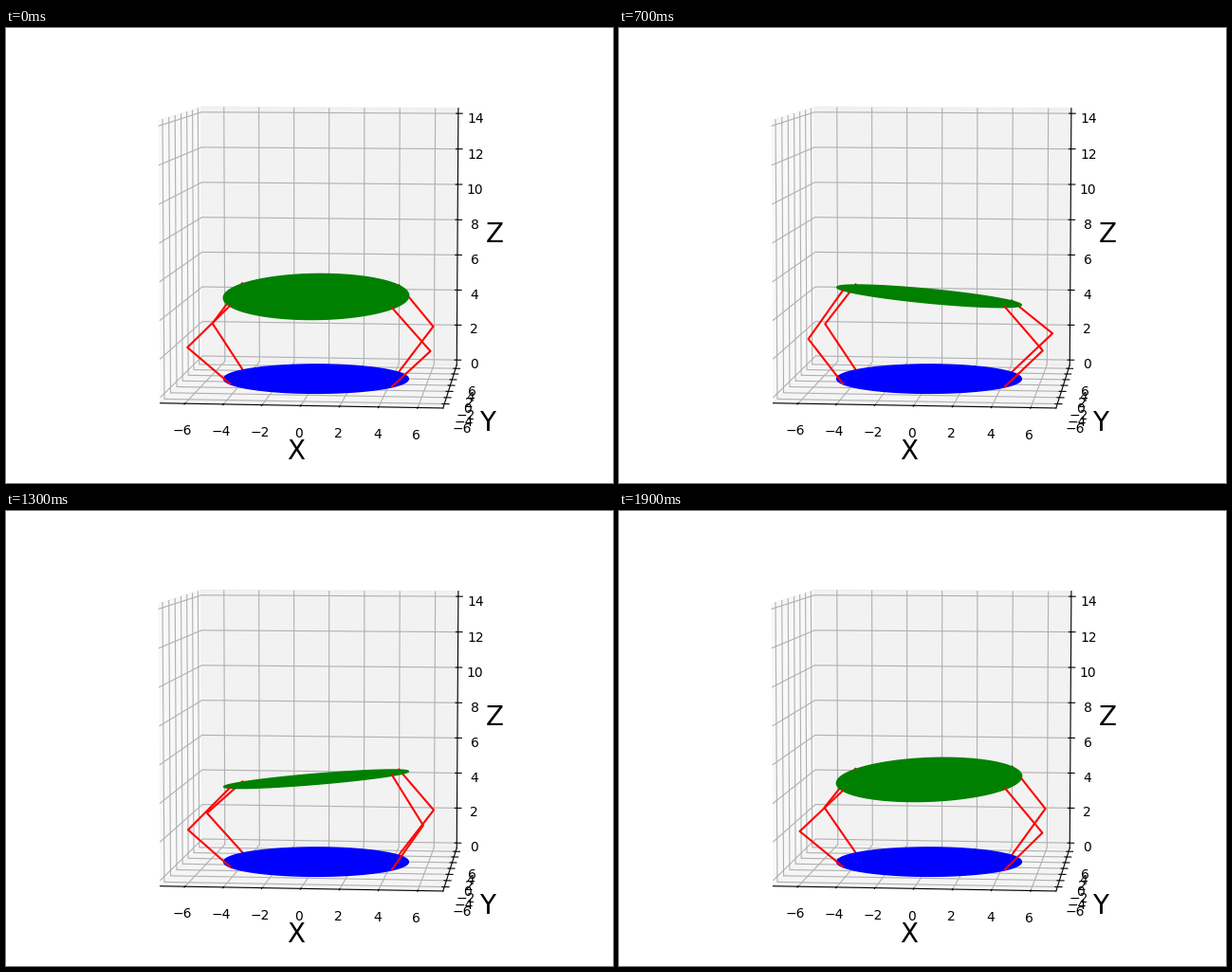
Recreate the animation shown at these times as a matplotlib script. Size 640x480 px, loop 2000 ms.

```python
import numpy as np
import matplotlib.pyplot as plt
from matplotlib.animation import FuncAnimation
from mpl_toolkits.mplot3d.art3d import Poly3DCollection

FRAMES = 20
RADIUS = 5.0
HEIGHT = 4.5
LINK = 3.2
TILT = 6.6
SPAN = 14
PAD = SPAN / 48

fig = plt.figure(figsize=(6.4, 4.8), dpi=100)
ax = fig.add_axes([0, 0, 1, 1], projection="3d", computed_zorder=False)
ax.set_box_aspect((1, 1, 1))
ax.view_init(elev=6, azim=-84)
ax.set_xlim(-7 - PAD, 7 + PAD)
ax.set_ylim(-7 - PAD, 7 + PAD)
ax.set_zlim(-PAD, SPAN + PAD)
ax.set_xticks(range(-6, 7, 2))
ax.set_yticks(range(-6, 7, 2))
ax.set_zticks(range(0, 15, 2))
ax.set_xlabel("X", fontsize=20)
ax.set_ylabel("Y", fontsize=20)
ax.set_zlabel("Z", fontsize=20)


def ring(angles):
    return np.column_stack([RADIUS * np.cos(angles), RADIUS * np.sin(angles),
                            np.zeros(len(angles))])


def wave(phase):
    return np.radians(TILT) * (np.cos(phase) + np.cos(3 * phase) / 11)


def rotation(pitch, roll):
    cp, sp, cr, sr = np.cos(pitch), np.sin(pitch), np.cos(roll), np.sin(roll)
    rx = np.array([[1, 0, 0], [0, cp, -sp], [0, sp, cp]])
    ry = np.array([[cr, 0, sr], [0, 1, 0], [-sr, 0, cr]])
    return rx @ ry


def knee(foot, top):
    """Joint of two equal links, bent outwards from the centre."""
    d = top - foot
    out = foot / RADIUS
    out = out - d * (out @ d) / (d @ d)
    out /= np.linalg.norm(out)
    return (foot + top) / 2 + out * np.sqrt(LINK ** 2 - d @ d / 4)


disc = ring(np.linspace(0, 2 * np.pi, 120, endpoint=False))
feet = ring(np.radians([30, 150, 210, 330]))

base = Poly3DCollection([disc], facecolor="blue", edgecolor="blue", linewidth=1, zorder=4)
plate = Poly3DCollection([disc], facecolor="green", edgecolor="green", linewidth=1, zorder=5)
ax.add_collection3d(base)
ax.add_collection3d(plate)
legs = [ax.plot([], [], [], color="red", lw=1.5, zorder=3 if foot[1] > 0 else 6)[0]
        for foot in feet]


def update(i):
    phase = 2 * np.pi * i / FRAMES
    turn = rotation(wave(phase), wave(phase - np.pi / 2))
    lift = np.array([0, 0, HEIGHT])
    plate.set_verts([disc @ turn.T + lift])
    for leg, foot, top in zip(legs, feet, feet @ turn.T + lift):
        leg.set_data_3d(*np.array([foot, knee(foot, top), top]).T)
    return [plate, *legs]


anim = FuncAnimation(fig, update, frames=FRAMES, interval=100, repeat=True,
                     repeat_delay=0, blit=False)
plt.show()
```
